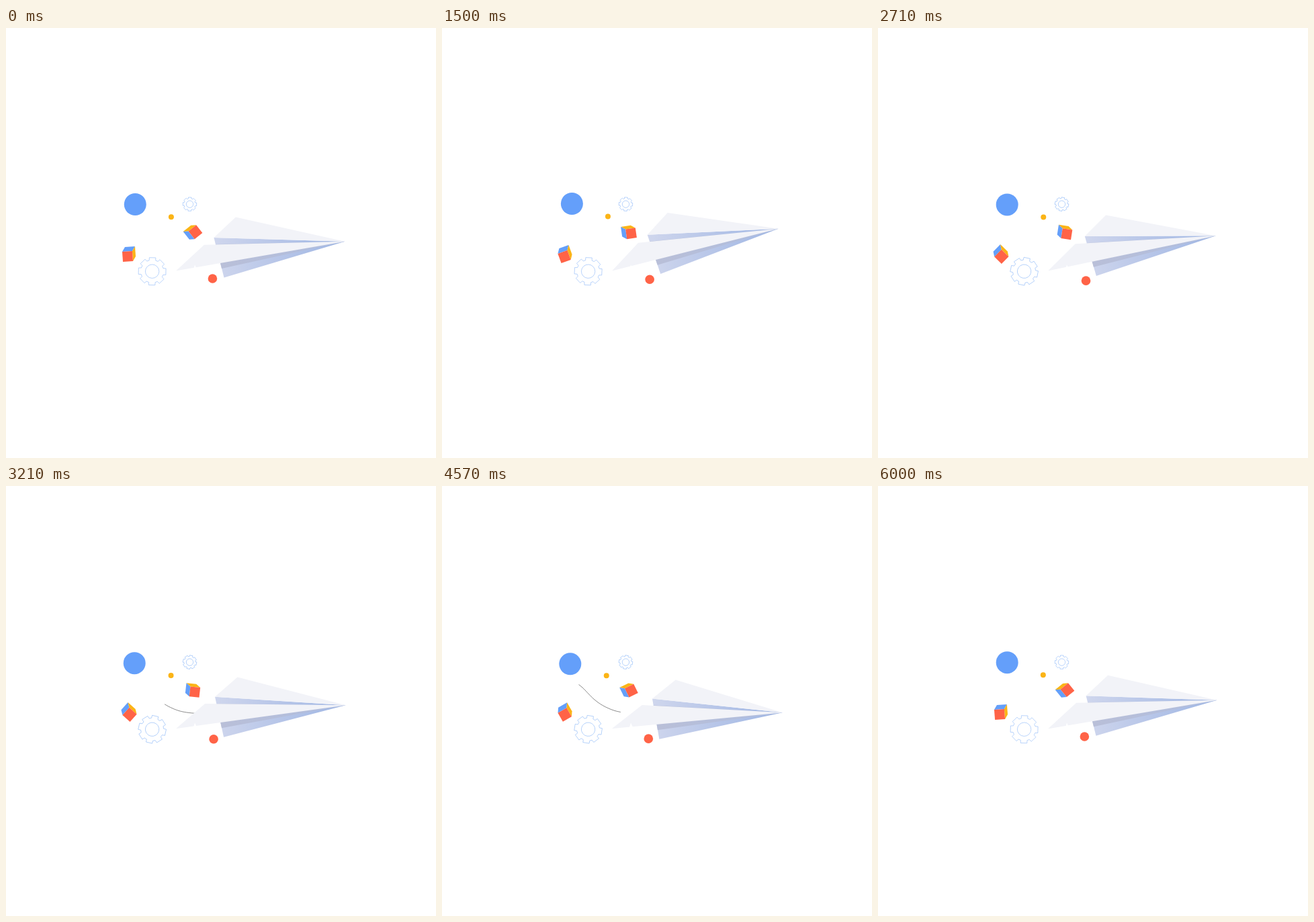
Animation, 640 px wide and 640 px high, one loop 6.07 s. Source, as an HTML page:

```html
<!DOCTYPE html>
<html lang="en">
<head>
<meta charset="utf-8">
<title>Paper plane</title>
<style>
  html, body { margin: 0; width: 100%; height: 100%; overflow: hidden; background: #fff; }
  svg { display: block; width: 100vw; height: 100vh; }
  .line { fill: none; stroke: #8db8f8; stroke-width: .6; stroke-linejoin: round; }
  .red { fill: #ff6347; }
  .blue { fill: #649ffa; }
  .yellow { fill: #fbb416; }
  .paper { fill: #f2f3f8; }
  #trail { fill: none; stroke: #777; stroke-width: .85; }
</style>
</head>
<body>
<svg viewBox="0 0 640 640">
  <defs>
    <linearGradient id="fold" gradientUnits="userSpaceOnUse" x1="310" y1="0" x2="490" y2="0">
      <stop offset="0" stop-color="#cfd6ed"/>
      <stop offset=".55" stop-color="#b6c5e8"/>
      <stop offset="1" stop-color="#a2b8e4"/>
    </linearGradient>
    <linearGradient id="shade" gradientUnits="userSpaceOnUse" x1="319" y1="0" x2="480" y2="0">
      <stop offset="0" stop-color="#b9bfd8"/>
      <stop offset="1" stop-color="#b0bddd"/>
    </linearGradient>
  </defs>

  <circle id="ball" class="blue" r="16.5"/>
  <circle id="bead" class="yellow" r="4"/>
  <circle id="dot" class="red" r="6.8"/>

  <g id="bigGear" class="line"><path/><circle r="10.2"/></g>
  <g id="smallGear" class="line"><path/><circle r="5.2"/></g>

  <g id="cubeA"></g>
  <g id="cubeB"></g>

  <!-- runs from the plane back to the left -->
  <path id="trail" d="M300 339C268 338.5 258 335.5 248 331C213 316 214 291 185 290C168 288 155 294 145 303"/>

  <g id="plane">
    <path fill="url(#fold)" d="M309.5 312L504.5 318L324.5 371.5Z"/>
    <path fill="url(#shade)" d="M312 322L504.5 318L321 358Z"/>
    <path class="paper" d="M342 281.5L504.5 318L309.5 312Z"/>
    <path class="paper" d="M295 322.7L504.5 318L253 361.3Z"/>
  </g>
  <path fill="#fff" d="M279 359L281 352.5L284 359Z"/>
</svg>

<script>
const LOOP = 6.07, STEPS = 85;
const $ = id => document.getElementById(id);

const soft = u => (1 - Math.cos(Math.PI * u)) / 2;
const gentle = u => (u + soft(u)) / 2;

// Swings between two values, reaching each once per loop at its own time.
function swing(low, lowTime, high, highTime, fall = soft) {
  const since = (t, from) => (t - from + LOOP) % LOOP;
  const riseTime = since(highTime, lowTime);
  return t => {
    const up = since(t, lowTime);
    const level = up < riseTime
      ? soft(up / riseTime)
      : 1 - fall((up - riseTime) / (LOOP - riseTime));
    return low + (high - low) * level;
  };
}

const pitch = swing(-5.17, 1.95, 5.35, 4.02, gentle);
const spinA = swing(-41, 5.6, 9, 2.8);
const spinB = swing(-48, 3.15, -3, .3);
const gearSpin = swing(0, .75, 13, 3.2);

const drifts = {
  ball: [swing(190.6, 3.9, 193.4, 1.7), swing(261.3, 1, 264.8, 4.6)],
  bead: [swing(244.7, 4.2, 247, 1.8), swing(280.6, 1.4, 282.3, 3.9)],
  dot: [swing(307, 5.2, 309.6, 2.4), swing(373, 0, 377, 3.9)]
};

function gearPath(outer, root) {
  const corners = [[root, -16.5], [outer, -13], [outer, 13], [root, 16.5]];
  let d = "";
  for (let k = 0; k < 8; k++) {
    for (const [r, deg] of corners) {
      const a = (k * 45 + deg - 90) * Math.PI / 180;
      d += (d ? "L" : "M") + (r * Math.cos(a)).toFixed(2) + " " + (r * Math.sin(a)).toFixed(2);
    }
  }
  return d + "Z";
}

// Front square plus two side faces pushed back along (dx, dy), centred on the origin.
function cube(id, size, dx, dy, topColor, sideColor) {
  const l = -dx / 2 - size / 2, r = l + size, t = -dy / 2 - size / 2, b = t + size;
  const side = dx < 0 ? l : r;
  const face = (cls, d) => `<path class="${cls}" d="${d}"/>`;
  $(id).innerHTML =
    face(topColor, `M${l} ${t}h${size}l${dx} ${dy}h${-size}Z`) +
    face(sideColor, `M${side} ${t}v${size}l${dx} ${dy}v${-size}Z`) +
    face("red", `M${l} ${t}H${r}V${b}H${l}Z`);
}

$("bigGear").firstChild.setAttribute("d", gearPath(20.9, 17));
$("smallGear").firstChild.setAttribute("d", gearPath(10.4, 8.5));
cube("cubeA", 14.8, -6.5, -4.5, "yellow", "blue");
cube("cubeB", 15, 4.5, -6.7, "blue", "yellow");

// Four bursts of the trail per loop, evenly spaced
const trail = { dash: 76, speed: 376, first: .557, every: 1.24, count: 4 };
$("trail").setAttribute("stroke-dasharray", trail.dash + " 999");

function trailHead(t) {
  const age = t - trail.first;
  const active = age >= 0 && age < trail.every * trail.count;
  return active ? age % trail.every * trail.speed : 0;
}

const place = (id, x, y, deg) =>
  $(id).setAttribute("transform", `translate(${x} ${y}) rotate(${deg})`);

function draw(t) {
  for (const id in drifts) {
    const [x, y] = drifts[id];
    $(id).setAttribute("cx", x(t));
    $(id).setAttribute("cy", y(t));
  }
  place("bigGear", 217.6, 362.2, gearSpin(t));
  place("smallGear", 273.5, 262.2, gearSpin(t));
  place("cubeA", 278, 304, spinA(t));
  place("cubeB", 183, 336.5, spinB(t));
  $("plane").setAttribute("transform", `rotate(${pitch(t)} 254 359.5)`);
  $("trail").setAttribute("stroke-dashoffset", trail.dash - trailHead(t));
}

const begin = performance.now();
function tick() {
  const t = (performance.now() - begin) / 1000 % LOOP;
  // The small offset absorbs rounding at step boundaries.
  const step = Math.min(STEPS - 1, Math.floor(t / LOOP * STEPS + .06));
  draw(step * LOOP / STEPS);
  requestAnimationFrame(tick);
}
tick();
</script>
</body>
</html>
```
